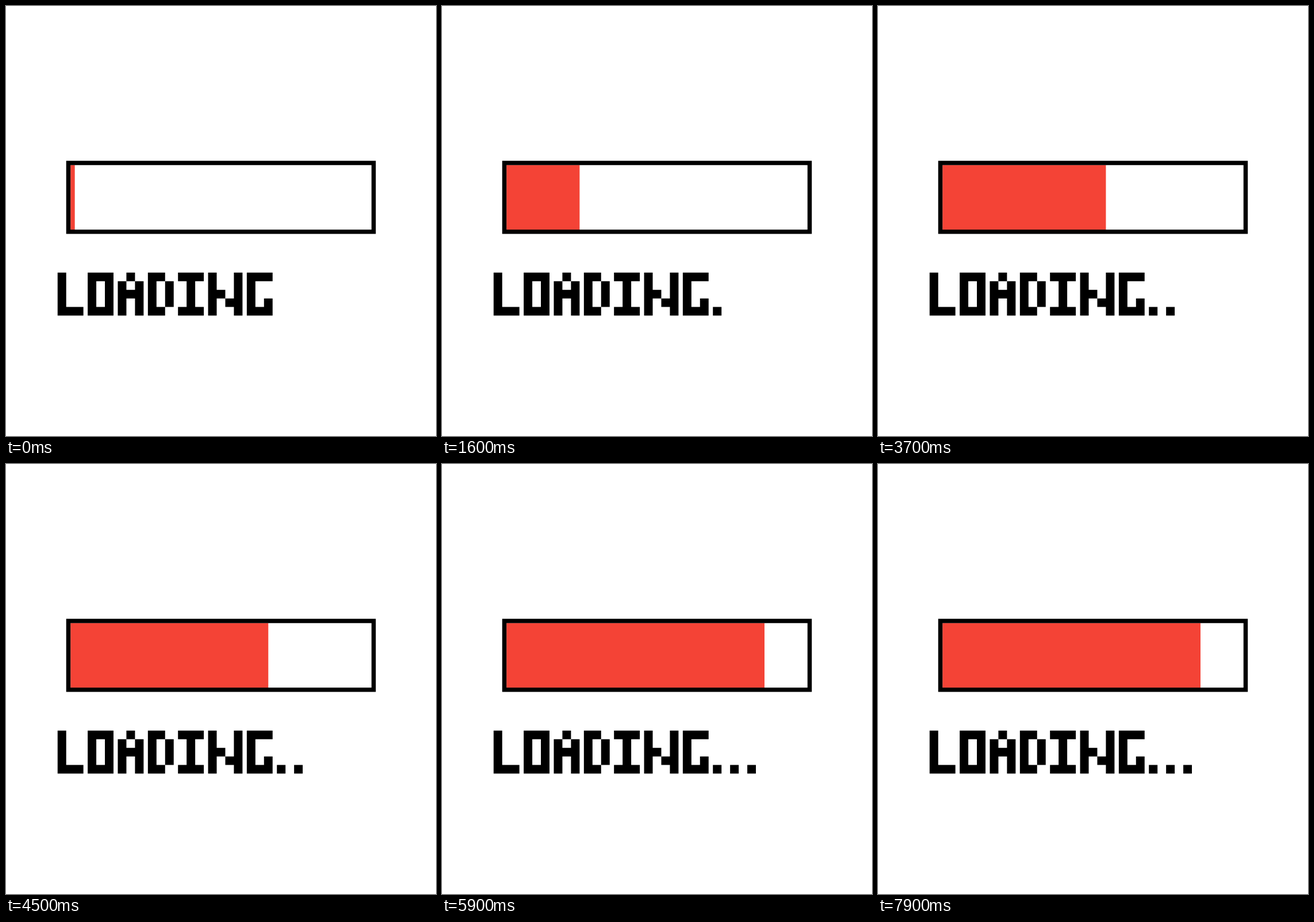
Animation of 748x748 px, one loop 8 s. Source, as an HTML page:

```html
<!DOCTYPE html>
<html lang="en">
<head>
<meta charset="utf-8">
<title>Loading</title>
<style>
  html, body { margin: 0; width: 100%; height: 100%; overflow: hidden; background: #fff; }
  svg { display: block; width: 100vw; height: 100vh; }
</style>
</head>
<body>
<svg viewBox="0 0 100 100" role="img" aria-label="Loading">
  <rect id="fill" x="15" y="37" height="15" fill="#f44336"/>
  <rect x="14.5" y="36.5" width="71" height="16" fill="none" stroke="#000"/>
  <path id="word"/>
</svg>
<script>
const LOOP = 8000, STEP = 100;
const START = 16, FULL = 85;
const HELD_STEPS = [3, 73, 75];
const DOT_STEPS = [16, 37, 59];
const TEXT_X = 12, TEXT_Y = 62, CELL = 2;

const GLYPHS = {
  L: '#.. #.. #.. #.. ###',
  O: '### #.# #.# #.# ###',
  A: '.#. #.# ### #.# #.#',
  D: '##. #.# #.# #.# ##.',
  I: '### .#. .#. .#. ###',
  N: '#..# #..# ##.# #.## #..#',
  G: '### #.. #.. #.# ###',
  '.': '. . . . #'
};

const fill = document.getElementById('fill');
const word = document.getElementById('word');

function textPath(text) {
  let x = TEXT_X, path = '';
  for (const char of text) {
    const rows = GLYPHS[char].split(' ');
    rows.forEach((row, r) => {
      for (const run of row.matchAll(/#+/g)) {
        const width = run[0].length * CELL;
        path += `M${x + run.index * CELL} ${TEXT_Y + r * CELL}h${width}v${CELL}h${-width}z`;
      }
    });
    // Dots are spaced one full cell apart, letters half a cell.
    x += rows[0].length * CELL + (char === '.' ? 2 : 1);
  }
  return path;
}

const wordPaths = [0, 1, 2, 3].map(n => textPath('LOADING' + '.'.repeat(n)));

function draw(time) {
  const step = Math.floor((time % LOOP) / STEP);
  const moved = HELD_STEPS.includes(step) ? step - 1 : step;
  // The bar grows one unit per step, then shrinks at the same pace.
  const edge = FULL - Math.abs(FULL - START - moved);
  fill.setAttribute('width', edge - 15);
  word.setAttribute('d', wordPaths[DOT_STEPS.filter(s => step >= s).length]);
}

const begin = performance.now();
function tick() {
  draw(performance.now() - begin);
  requestAnimationFrame(tick);
}
tick();
</script>
</body>
</html>
```
